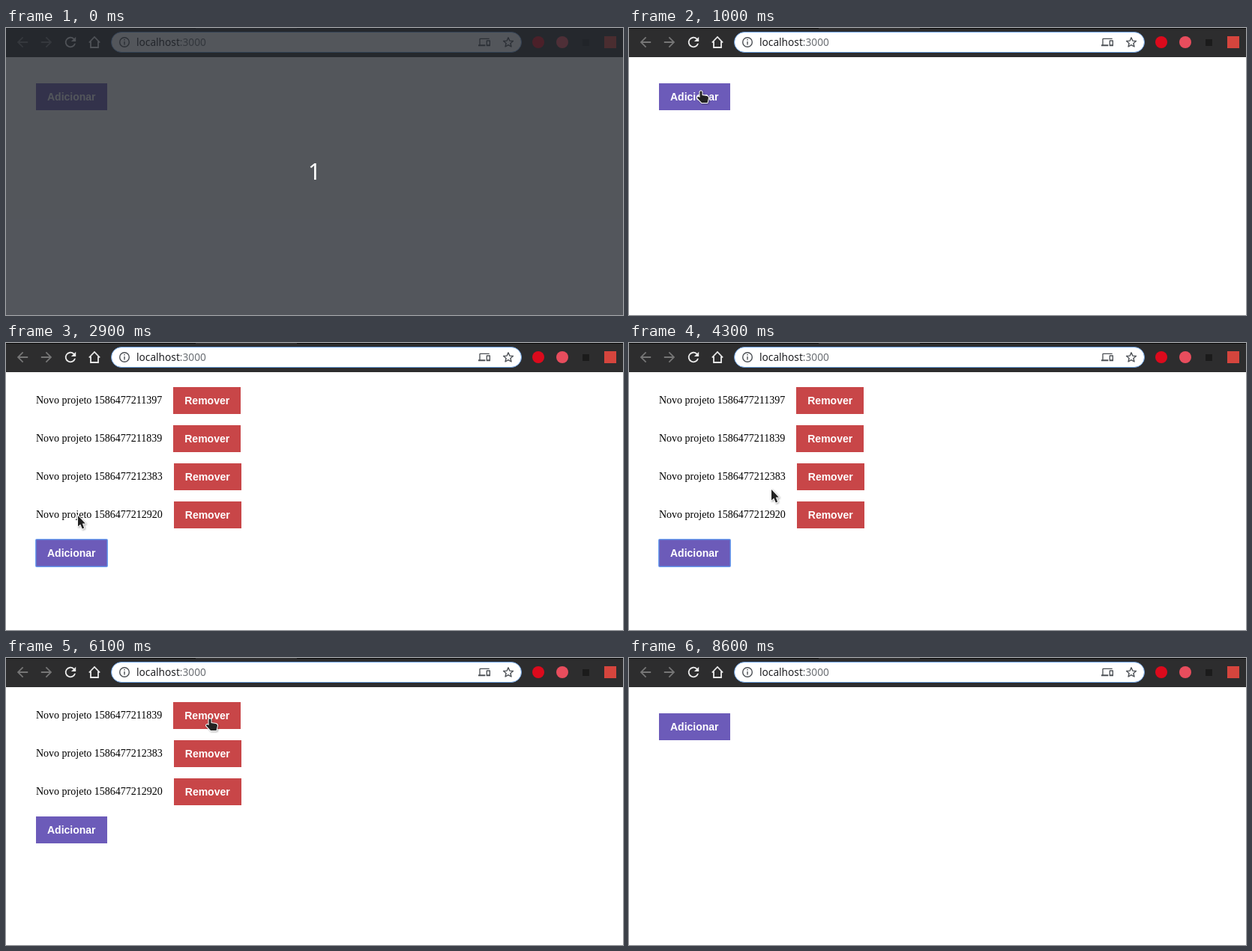
Write an HTML page that moves like this. It is 823 px wide and 384 px high and loops after 9 s.

```html
<!DOCTYPE html>
<html lang="pt">
<head>
<meta charset="utf-8">
<title>Projetos</title>
<style>
  html, body { margin: 0; width: 100%; height: 100%; overflow: hidden; background: #fff; }
  svg { position: absolute; left: 0; top: 0; }
  .row { position: absolute; left: 40px; display: flex; align-items: flex-start; white-space: nowrap;
    font: 14px/35px "Liberation Serif", serif; color: #000; }
  .button { padding: 10px 15px; background: #c84648; color: #fff;
    font: bold 14px/16px "Liberation Sans", sans-serif; }
  .row .button { margin-left: 15px; }
  #add { position: absolute; left: 40px; background: #6c5bb9; }
  #add.focused { border-radius: 1px; box-shadow: 0 0 0 1px #70a2f0, inset 0 0 0 1px #5b8fe880; }
  #pointer path { stroke: #fff; stroke-width: 2; stroke-linejoin: round; paint-order: stroke;
    fill: #222; filter: drop-shadow(1px 1px 1px #0005); }
  #countdown { position: absolute; inset: 0; background: rgba(35, 39, 46, .78); }
</style>
</head>
<body>
<svg width="823" height="39">
  <rect width="823" height="39" fill="#2d2d2e"/>
  <path d="M0 .5H253M388 .5H823" stroke="#080808"/>
  <g fill="#767676">
    <path id="back" transform="translate(11.2 8.2) scale(.9)"
      d="M20 11H7.8l5.6-5.6L12 4l-8 8 8 8 1.4-1.4L7.8 13H20z"/>
    <use href="#back" transform="matrix(-1 0 0 1 76 0)"/>
  </g>
  <path fill="#ececec" transform="translate(75.2 8.2) scale(.9)"
    d="M17.65 6.35A8 8 0 1 0 19.73 14h-2.08A6 6 0 1 1 16.22 7.78L13 11h7V4z"/>
  <path d="M110.8 19.5 118 12l7.2 7.5M113 18v8h10v-8" fill="none" stroke="#ececec" stroke-width="1.8"/>
  <rect x="140.5" y="5.5" width="547" height="27" rx="13.5" fill="#fff" stroke="#6a9fe0"/>
  <g fill="none" stroke="#4d5156" stroke-width="1.4">
    <circle cx="158" cy="19" r="6.3"/>
    <path d="M158 18v4.5M158 15v1.6"/>
    <path stroke-linejoin="round"
      d="m670 12.8 1.8 4.3 4.6.4-3.5 3 1.1 4.5-4-2.4-4 2.4 1.1-4.5-3.5-3 4.6-.4z"/>
  </g>
  <path fill="#4d5156" transform="translate(630 11) scale(.667)"
    d="M4 6h18V4H4a2 2 0 0 0-2 2v11H0v3h14v-3H4zm19 2h-6a1 1 0 0 0-1 1v10a1 1 0 0 0 1 1h6a1 1 0 0 0 1-1V9a1 1 0 0 0-1-1zm-1 9h-4v-7h4z"/>
  <text x="174" y="24" font-family="Noto Sans, sans-serif" font-size="13.7" fill="#202124">localhost<tspan fill="#6b6f74">:3000</tspan></text>
  <circle cx="710" cy="19" r="8" fill="#dc0a1c"/>
  <circle cx="742" cy="19" r="8" fill="#e84d5d"/>
  <rect x="769" y="15" width="9" height="9" fill="#1b1b1b"/>
  <rect x="798" y="11" width="16" height="16" fill="#d5453d"/>
</svg>
<div id="rows"></div>
<div id="add" class="button">Adicionar</div>
<svg width="823" height="384">
  <g id="pointer">
    <path id="arrow" d="M0 0V14.5L3.2 11.5 5.8 17.5 8.2 16.5 5.8 10.6H9.8z"/>
    <path id="hand" d="M-1.5 1.5Q0-1 1.5 1.5V6L8 7Q10 7.5 10 9.5L8.5 16H1L-5 9.5Q-4.5 7-2 8.8L-1.5 9z"/>
  </g>
</svg>
<svg id="countdown" width="823" height="384">
  <text x="411.5" y="203" text-anchor="middle" font-family="Noto Sans, sans-serif" font-size="30" fill="#fff">1</text>
</svg>
<script>
const LOOP = 9000, STEP = 100;
const ROW_TOP = 59, PITCH = 51, HEIGHT = 36;
const ENTER = 300, LEAVE = 8600;

// Each project is named after the millisecond of its click
const delays = [0, 442, 986, 1523];
const ids = delays.map(delay => 1586477211397 + delay);
const addTimes = delays.map(delay => 1400 + Math.round(delay / STEP) * STEP);
const removeTimes = [5900, 6400, 6900, 8000];

// Pointer legs: the pointer reaches x, y at `end` after moving for `span`
const leg = (end, span, x, y) => ({ end, span, x, y });
const legs = [
  leg(1000, 700, 96, 84),
  ...addTimes.slice(1).map((time, i) => leg(time - 100, 300, 96, 133 + 49 * i)),
  leg(3800, 900, 171, 243),
  leg(4400, 400, 194, 187),
  leg(4800, 300, 169, 138),
  leg(5700, 800, 272, 81),
  leg(7400, 300, 265, 98),
  leg(7700, 100, 265, 94),
  leg(LEAVE, LEAVE - 7700, 304, 2)
];

const $ = id => document.getElementById(id);
const show = (id, visible) => $(id).style.display = visible ? '' : 'none';
const passed = (times, t) => times.filter(time => time <= t).length;
const clamp = k => Math.min(1, Math.max(0, k));
const ease = k => k * k * (3 - 2 * k);

function pointerAt(t) {
  let x = 549, y = 103;
  for (const { end, span, x: toX, y: toY } of legs) {
    const k = ease(clamp((t - end + span) / span));
    x += (toX - x) * k;
    y += (toY - y) * k;
  }
  return [x, y];
}

function render(t) {
  const removed = passed(removeTimes, t);
  const items = ids.slice(removed, passed(addTimes, t));
  const listEnd = ROW_TOP + PITCH * items.length;
  const addTop = items.length ? listEnd : 74;

  $('rows').innerHTML = items.map((id, i) =>
    `<div class="row" style="top:${ROW_TOP + PITCH * i}px">Novo projeto ${id}<span class="button">Remover</span></div>`
  ).join('');
  $('add').style.top = addTop + 'px';
  $('add').classList.toggle('focused', t >= addTimes[0] && !removed);
  show('countdown', t < 100);

  const [x, y] = pointerAt(t);
  const onAdd = x >= 40 && x < 135 && y >= addTop && y < addTop + HEIGHT;
  const onRemove = x >= 223 && x < 314 && y >= ROW_TOP && y < listEnd && (y - ROW_TOP) % PITCH < HEIGHT;
  show('pointer', t >= ENTER && t < LEAVE);
  show('hand', onAdd || onRemove);
  show('arrow', !onAdd && !onRemove);
  $('pointer').setAttribute('transform', `translate(${Math.round(x)} ${Math.round(y)})`);
}

let shown = -1;
function tick() {
  const t = Math.floor(performance.now() % LOOP / STEP) * STEP;
  if (t !== shown) render(shown = t);
  requestAnimationFrame(tick);
}
tick();
</script>
</body>
</html>
```
